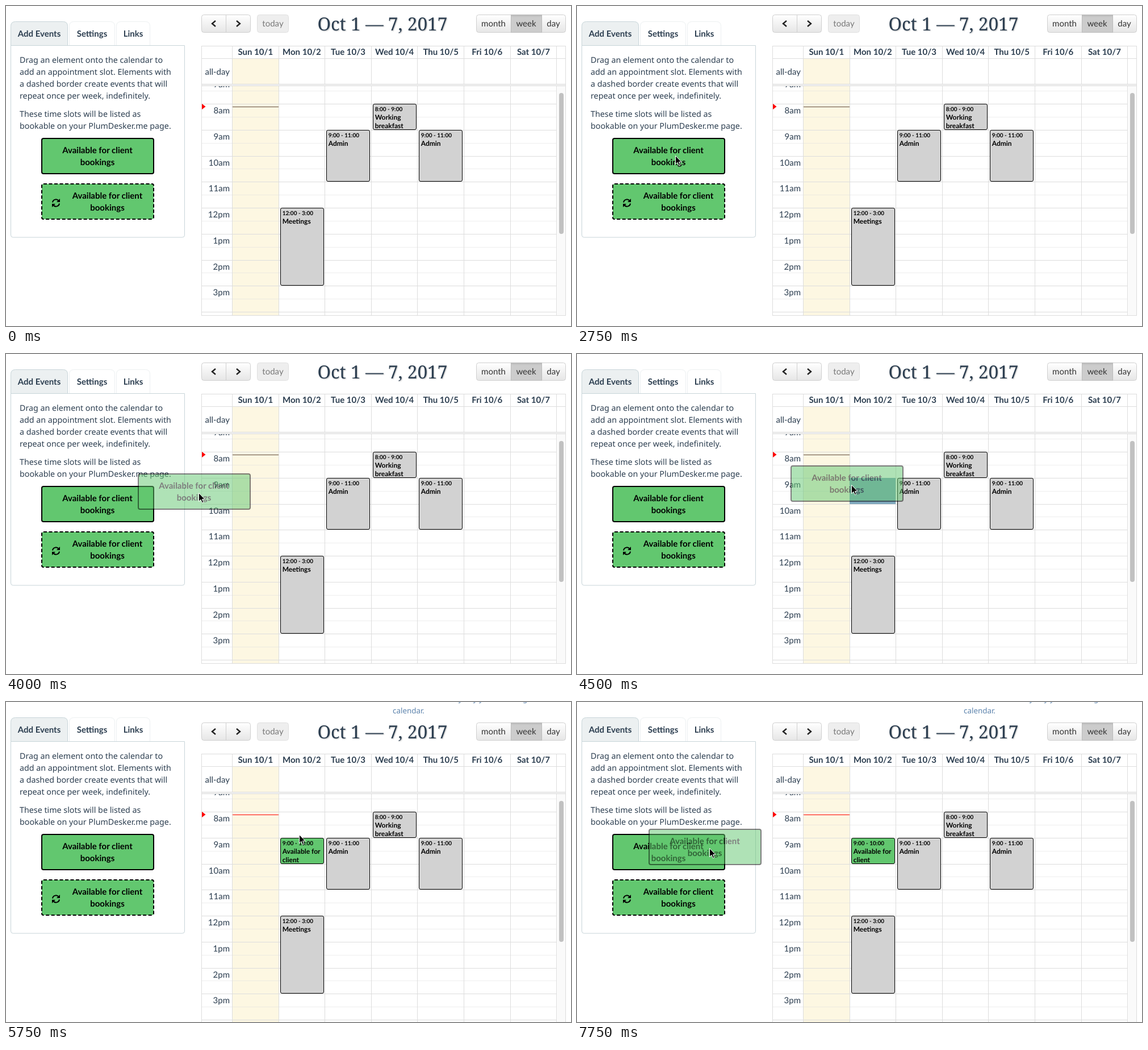
An HTML page for the animation above (8000 ms loop, 995 px wide and 563 px high).

```html
<!DOCTYPE html>
<html lang="en">
<head>
<meta charset="utf-8">
<title>Booking calendar</title>
<style>
html, body { margin: 0; height: 100%; overflow: hidden; background: #fff; }
svg { display: block; width: 100vw; height: 100vh; }
text { font: 15px Lato, sans-serif; fill: #2c3e50; text-rendering: geometricPrecision; white-space: pre; }
.bold { font-weight: 700; }
.black { font-weight: 700; fill: #000; }
.copy { font: 14.27px "Noto Sans", sans-serif; }
.note { font: 13.4px "Noto Sans", sans-serif; fill: #5d84ad; }
.title { font: 31.7px "Noto Serif", serif; text-shadow: 1px 1px 2px #0004; }
.label { fill: #333; }
.time { font-size: 10px; font-weight: 700; fill: #000; }
.event { font-size: 12px; font-weight: 700; fill: #000; }
</style>
</head>
<body>
<svg id="stage" viewBox="0 0 995 563"></svg>
<script>
const GREEN = '#62c76f', GREY = '#d2d2d2', LINE = '#ddd';
const LEFT = 344.5, GRID = 398.5, COL = 81.6, HOUR = 45.75, EIGHT = 172;

const text = (x, y, s, cls = '', anchor = 'start') =>
  `<text x="${x}" y="${y}" class="${cls}" text-anchor="${anchor}">${s}</text>`;
const rect = (x, y, w, h, fill, extra = '') =>
  `<rect x="${x}" y="${y}" width="${w}" height="${h}" fill="${fill}" ${extra}/>`;
const path = (d, stroke = LINE, extra = '') =>
  `<path d="${d}" fill="none" stroke="${stroke}" ${extra}/>`;
const hline = (y, x1 = LEFT, x2 = 970, extra = '') => path(`M${x1} ${y}H${x2}`, LINE, extra);
const range = (n, make) => Array.from({ length: n }, (_, i) => make(i)).join('');
const colX = day => GRID + day * COL;
const hourY = hour => Math.round(EIGHT + (hour - 8) * HOUR) + .5;

function slotBox(x, y, textX, extra = '') {
  return rect(x + 1, y + 1, 197, 62, GREEN, `rx="3" stroke="#000" stroke-width="2" ${extra}`) +
    text(x + textX, y + 27, 'Available for client', 'black', 'middle') +
    text(x + textX, y + 48, 'bookings', 'black', 'middle');
}

function tab(x, w, label, fill, stroke) {
  return path(`M${x} 69.5V35.5q0-8 8-8h${w - 16}q8 0 8 8V69.5`, stroke, `style="fill:${fill}"`) +
    text(x + w / 2, 53.5, label, 'bold', 'middle');
}

function sidebar() {
  const copy = [
    [100, 'Drag an element onto the calendar to'],
    [121, 'add an appointment slot. Elements with'],
    [142, 'a dashed border create events that will'],
    [163, 'repeat once per week, indefinitely.'],
    [195, 'These time slots will be listed as'],
    [216, 'bookable on your PlumDesker.me page.']
  ];
  const arrow = path('M-6 -1A6 6 0 0 1 4.5 -4', '#000', 'stroke-width="2"') +
    '<path d="M7 -7.5V-1.5H1z"/>';
  return tab(8.5, 100, 'Add Events', '#ecf0f1', '#c8d5d9') +
    tab(111.5, 80, 'Settings', '#fff', '#ecf0f1') +
    tab(194.5, 59, 'Links', '#fff', '#ecf0f1') +
    path('M8.5 69.5H314.5V403q0 4-4 4H12.5q-4 0-4-4z', '#c8d5d9') +
    copy.map(([y, s]) => text(24, y, s, 'copy')).join('') +
    slotBox(62, 232, 99) +
    slotBox(62, 312, 116.5, 'stroke-dasharray="6 3.5"') +
    `<g transform="translate(88 346.5)">${arrow}<g transform="rotate(180)">${arrow}</g></g>`;
}

function buttonGroup(x, w, fill = 'url(#button)') {
  return rect(x, 15.5, w, 31, fill, 'rx="4" stroke="#cfcfcf"');
}

function toolbar() {
  const chevron = d => path(d, '#222', 'stroke-width="2.4"');
  return buttonGroup(344.5, 86) + path('M387.5 16V46', '#cfcfcf') +
    chevron('M369 26l-6 5 6 5') + chevron('M406 26l6 5-6 5') +
    `<g opacity=".65">${buttonGroup(442.5, 55, '#e6e6e6')}${text(470, 36, 'today', 'label', 'middle')}</g>` +
    text(663, 43, 'Oct 1 — 7, 2017', 'title', 'middle') +
    buttonGroup(828.5, 157) + rect(889.5, 15.5, 54, 31, 'url(#pressed)', 'stroke="#bbb"') +
    text(858.5, 36, 'month', 'label', 'middle') +
    text(916, 36, 'week', 'label', 'middle') +
    text(964, 36, 'day', 'label', 'middle');
}

function event(day, from, to, fill, time, ...lines) {
  const x = Math.round(colX(day) + 2.5) + .5, y = hourY(from);
  return rect(x, y, 76, hourY(to) - y - 1, fill, 'rx="2.5" stroke="#000"') +
    text(x + 3.2, y + 12.5, time, 'time') +
    lines.map((s, i) => text(x + 3.2, y + 27.5 + i * 14.7, s, 'event')).join('');
}

function calendar() {
  const days = ['Sun', 'Mon', 'Tue', 'Wed', 'Thu', 'Fri', 'Sat'];
  const hours = ['7am', '8am', '9am', '10am', '11am', '12pm', '1pm', '2pm', '3pm'];
  return toolbar() +
    rect(399, 92, 81, 453, '#fdf7e2') +
    rect(971, 141, 14, 404, '#fafafa') +
    days.map((d, i) => text(colX(i + .5), 86, `${d} 10/${i + 1}`, 'bold', 'middle')).join('') +
    text(394, 120.5, 'all-day', '', 'end') +
    '<g clip-path="url(#grid)">' +
    hours.map((h, i) => hline(hourY(i + 7)) +
      hline(hourY(i + 7.5), LEFT, 970, 'stroke-dasharray="1 1"') +
      text(394, hourY(i + 7) + 16.5, h, '', 'end')).join('') +
    hline(hourY(16)) + '</g>' +
    range(8, i => path(`M${Math.floor(colX(i)) + .5} 70V545`)) +
    rect(345, 138, 640, 2, '#f2f2f2') +
    hline(92.5, LEFT, 985) + hline(137.5, LEFT, 985) + hline(140.5, LEFT, 985) +
    rect(LEFT, 70.5, 641, 474, 'none', `stroke="${LINE}"`) +
    rect(974, 153, 8, 248, '#c1c1c1', 'rx="4"') +
    '<path id="now" d="M399 177.5H480"/><path d="M345 172l6.5 5-6.5 5z" fill="#f00"/>' +
    event(1, 12, 15, GREY, '12:00 - 3:00', 'Meetings') +
    event(2, 9, 11, GREY, '9:00 - 11:00', 'Admin') +
    event(3, 8, 9, GREY, '8:00 - 9:00', 'Working', 'breakfast') +
    event(4, 9, 11, GREY, '9:00 - 11:00', 'Admin') +
    `<g id="booked">${event(1, 9, 10, GREEN, '9:00 - 10:00', 'Available for', 'client')}</g>` +
    `<g id="handle">${text(520.5, 261, '=', 'event', 'middle')}</g>` +
    rect(0, 218, 81, 46, '#7fa8bd', 'id="target"');
}

const gradient = (id, from, to, end = 1) => `<linearGradient id="${id}" x2="0" y2="1">
  <stop stop-color="${from}"/><stop offset="${end}" stop-color="${to}"/></linearGradient>`;

const stage = document.getElementById('stage');
stage.innerHTML = `<defs>${gradient('button', '#fff', '#e6e6e6')}${gradient('pressed', '#b8b8b8', '#ccc', .15)}
  <clipPath id="grid">${rect(344, 140, 642, 405, '#000')}</clipPath></defs>
  ${sidebar()}
  <g id="calendar">${calendar()}</g>
  <g id="peek">${text(984, -1.5, 'during periods saved in meeting', 'note', 'end')}</g>
  <g id="notice">${text(803, -1, 'book times on any day you are using', 'note', 'middle')}
    ${text(709, 20, 'calendar.', 'note', 'middle')}</g>
  <g id="ghost" opacity=".5">${slotBox(0, 0, 99)}</g>
  <path id="cursor" d="M.5 .5V15.5L4 12.3 6.4 17.8 8.8 16.7 6.5 11.4H11z" stroke="#fff"/>`;

const part = id => document.getElementById(id);
const show = (id, on) => part(id).setAttribute('visibility', on ? 'visible' : 'hidden');
const move = (id, x, y) => part(id).setAttribute('transform', `translate(${x} ${y})`);

// Pointer stops: time, x, y
const STOPS = [
  [750, 575, 130], [1250, 215, 262], [1500, 157, 275], [1750, 157, 271], [2000, 159, 267],
  [2250, 159, 267], [3500, 194, 258], [4500, 483, 230], [4750, 521, 231],
  [5000, 516, 233], [6000, 516, 233], [6250, 258, 356], [6500, 258, 356], [6750, 288, 246],
  [7250, 171, 266], [7750, 233, 257]
];

function pointerAt(t) {
  const next = STOPS.findIndex(stop => stop[0] >= t);
  if (next < 1) return STOPS[0].slice(1);
  const [t0, x0, y0] = STOPS[next - 1], [t1, x1, y1] = STOPS[next];
  const k = (t - t0) / (t1 - t0);
  return [Math.round(x0 + (x1 - x0) * k), Math.round(y0 + (y1 - y0) * k)];
}

function draw(now) {
  // The screen refreshes four times a second.
  const t = Math.floor(now % 8000 / 250) * 250;
  const [x, y] = pointerAt(t);
  const dragging = t >= 3500 && t < 5000 || t >= 7500;
  const lowered = t >= 5750;
  show('cursor', t >= 750);
  move('cursor', x, y);
  show('ghost', dragging);
  move('ghost', x - 107, y - 34);
  show('target', dragging && x > GRID);
  move('target', Math.round(colX(Math.floor((x - GRID) / COL))), 0);
  show('booked', t >= 5000);
  show('handle', t >= 5000 && !lowered);
  show('peek', t >= 5000 && !lowered);
  show('notice', lowered);
  move('calendar', 0, lowered ? 21 : 0);
  part('now').setAttribute('stroke', lowered ? '#f00' : '#5f4b3c');
  requestAnimationFrame(() => draw(performance.now()));
}
draw(performance.now());
</script>
</body>
</html>
```
